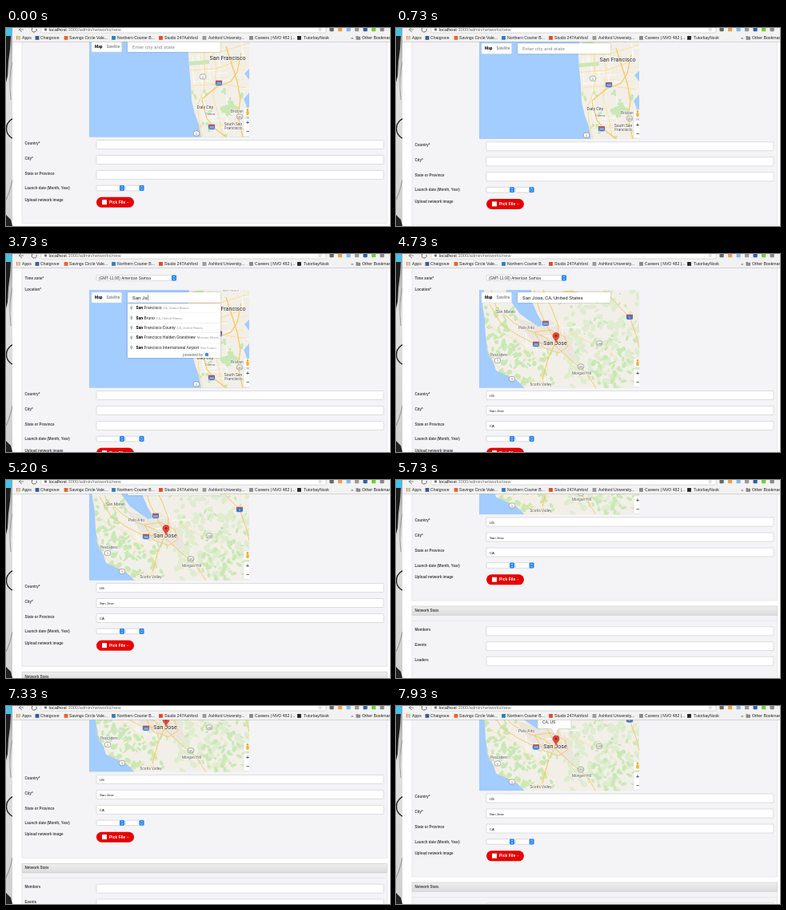
These frames come from a looping animation (480x248 px, 8000 ms). An HTML page with a canvas:

```html
<!DOCTYPE html>
<html lang="en">
<head>
<meta charset="utf-8">
<title>New network form</title>
<style>
html, body { margin: 0; width: 100%; height: 100%; overflow: hidden; background: #fff; }
canvas { display: block; width: 480px; height: 248px; }
</style>
</head>
<body>
<canvas id="stage"></canvas>
<script>
const LOOP = 8000, W = 480, H = 248;
const canvas = document.getElementById('stage');
const ratio = window.devicePixelRatio || 1;
canvas.width = W * ratio;
canvas.height = H * ratio;
const c = canvas.getContext('2d');
const SANS = '"Liberation Sans", sans-serif', ROBOTO = 'Roboto, sans-serif';

// Each pair is [time, scroll offset], eased in between.
const scrollKeys = [[0, 31], [600, 31], [1400, 0], [4800, 0], [5130, 42], [5270, 42],
  [5650, 124.5], [5800, 124.5], [6060, 86.5], [7270, 86.5], [7700, 61.5], [LOOP, 61.5]];
const typing = [[0, ''], [2650, 'S'], [2800, 'Sa'], [2950, 'San'], [3250, 'San '], [3450, 'San J'],
  [3650, 'San Js'], [3880, 'San J'], [4020, 'San Jo'], [4180, 'San Jos'], [4330, 'San Jose'],
  [4550, 'San Jose, CA, United States']];
const MENU_OPEN = 2950, PICKED = 4550, INFO_OPEN = 7600;

function scrollAt(t) {
  const i = scrollKeys.findIndex(k => k[0] > t);
  const [t0, a] = scrollKeys[i - 1], [t1, b] = scrollKeys[i];
  const p = (t - t0) / (t1 - t0);
  return a + (b - a) * p * p * (3 - 2 * p);
}

function box(x, y, w, h, fill, stroke, radius = 0) {
  c.beginPath();
  c.roundRect(x, y, w, h, radius);
  if (fill) { c.fillStyle = fill; c.fill(); }
  if (stroke) { c.strokeStyle = stroke; c.lineWidth = 0.6; c.stroke(); }
}

function disc(x, y, r, fill) {
  c.beginPath();
  c.arc(x, y, r, 0, 7);
  c.fillStyle = fill;
  c.fill();
}

// Draws text centred vertically on y and returns its right edge.
function text(s, x, y, size, color = '#222', { font = SANS, weight = '', align = 'left' } = {}) {
  c.font = `${weight} ${size}px ${font}`;
  c.textAlign = align;
  c.textBaseline = 'alphabetic';
  c.fillStyle = color;
  c.fillText(s, x, y + size * 0.35);
  return x + c.measureText(s).width;
}

function label(s, y) {
  text(s, 23.5, y, 4.5, '#444', { weight: 'bold' });
}

function shape(d, fill, stroke, width = 1) {
  const path = new Path2D(d);
  if (fill) { c.fillStyle = fill; c.fill(path); }
  if (stroke) { c.strokeStyle = stroke; c.lineWidth = width; c.lineJoin = 'round'; c.stroke(path); }
}

function seeded(seed) {
  return () => (seed = (seed * 16807) % 2147483647) / 2147483647;
}

function place(s, x, y, size = 5, color = '#555') {
  c.font = `${size}px ${ROBOTO}`;
  c.textAlign = 'center';
  c.strokeStyle = 'rgba(255,255,255,.8)';
  c.lineWidth = 1.2;
  c.strokeText(s, x, y + size * 0.35);
  text(s, x, y, size, color, { font: ROBOTO, align: 'center' });
}

function shield(s, x, y, interstate) {
  if (interstate) {
    box(x - 4.5, y - 3.5, 9, 7, '#4a73b8', '#fff', 2.5);
    box(x - 4, y - 3.2, 8, 1.5, '#c9504c');
  } else box(x - 3.7, y - 3, 7.4, 6, '#fff', '#777', 2.5);
  text(s, x, y + 0.4, 3.6, interstate ? '#fff' : '#444', { align: 'center' });
}

function patches(seed, count, x, y, w, h, color, size) {
  const random = seeded(seed);
  c.fillStyle = color;
  for (let i = 0; i < count; i++) {
    c.beginPath();
    c.ellipse(x + random() * w, y + random() * h, size * (0.4 + random()), size * (0.3 + random() * 0.6),
      random() * 3, 0, 7);
    c.fill();
  }
}

function streets(seed, count, x, y, w, h) {
  const random = seeded(seed);
  for (let i = 0; i < count; i++) {
    const n = 6 + random() * 18;
    const run = random() < 0.5 ? `${n} -1` : `2 ${n}`;
    shape(`M${x + random() * w} ${y + random() * h}l${run}`, null, i % 3 ? '#fff' : '#fbe6a9', 0.7);
  }
}

const LAND = '#f2efe8', WATER = '#a3ccff', GREEN = '#c9e8b5', ROAD = '#fbdf94', HIGHWAY = '#f8c65a';

function coastMap() {
  box(104, 45, 200, 123, WATER);
  const land = 'M229 45L228 64L229 80L231 100L232 122L236 138L241 152L244 168H304V146L297 140L301 130' +
    'L297 120L304 112V96L298 88L304 82V45Z';
  shape(land, LAND);
  c.save();
  c.clip(new Path2D(land));
  streets(31, 50, 228, 45, 76, 122);
  patches(8, 26, 232, 108, 66, 58, GREEN, 3.6);
  shape('M229 73L254 71V76L229 78Z', GREEN);
  shape('M268 130L282 125L292 131L280 138L270 137Z', GREEN);
  shape('M233 47L245 45L250 52L234 55Z', GREEN);
  shape('M247 45L249 94L246 112L240 126L241 147L246 168M229 84L262 82L290 72', null, ROAD, 1.1);
  shape('M231 62L268 61L304 50M235 103L268 101L301 106M254 46L263 80L259 118L266 142L271 168', null, ROAD, 0.9);
  shape('M245 120L263 105L281 98L289 86L294 62M245 121L251 144L261 157L276 168', null, HIGHWAY, 1.2);
  shape('M275 54L284 82L289 98L293 120L290 141L296 168', null, HIGHWAY, 1.2);
  c.restore();
  place('NORTH BEACH', 281, 46, 3, '#888');
  place('San Francisco', 277, 68, 7.2, '#222');
  place('Daly City', 249, 130, 5.4, '#333');
  place('Colma', 255, 138.5, 4.4);
  place('Brisbane', 290, 135, 4.6);
  place('South San', 284, 151, 5, '#444');
  place('Francisco', 284, 156.5, 5, '#444');
  shield('1', 246, 92);
  shield('1', 238, 163);
  shield('101', 292, 142);
  shield('280', 266, 100, true);
  shield('280', 257, 155, true);
}

function valleyMap() {
  box(104, 45, 200, 123, LAND);
  patches(5, 150, 212, 46, 96, 124, '#dfecd0', 4.5);
  patches(77, 55, 245, 105, 60, 64, GREEN, 3.2);
  patches(9, 30, 205, 46, 98, 90, GREEN, 2.4);
  patches(12, 75, 112, 66, 40, 84, GREEN, 3.4);
  patches(44, 50, 140, 112, 62, 52, GREEN, 3.2);
  shape('M150 80L176 88L192 82L207 92L219 112L226 132L214 128L200 122L180 118L166 104Z', '#eae6df');
  streets(17, 26, 160, 86, 50, 32);
  shape('M104 45H110L108 62L111 83L112 104L115 122L122 136L125 146L139 152L151 158L161 168H104Z', WATER);
  shape('M137 45L144 60L155 75L166 83L178 91L185 89L177 76L171 62L169 45Z', WATER);
  shape('M113 90L135 99L160 115L184 140L184 168M113 116L117 129L130 145L150 157L182 161' +
    'M200 111L221 99L242 111L259 112L278 134M188 130L190 148L180 161', null, ROAD, 0.7);
  shape('M119 45L125 66L147 86L166 96L186 104L204 119L220 134L238 149L250 168' +
    'M117 63L131 87L151 101L173 112L199 111M173 45L179 70L187 87L200 110L191 128L183 157' +
    'M184 45L195 69L203 90L202 110M260 45L283 70L292 79L301 104L304 118M178 52L218 47L258 52' +
    'M173 98L193 95L211 104L215 116L203 124L184 117Z', null, HIGHWAY, 0.9);
  place('San Mateo', 137, 72, 5);
  place('Palo Alto', 163, 92.5, 5);
  place('Pescadero', 129, 126, 4.5);
  place('Morgan Hill', 232, 149, 4.7);
  place('Scotts Valley', 181, 163, 4.7);
  shield('1', 127, 133.5);
  shield('1', 145, 156.5);
  shield('101', 231, 141);
  shield('130', 254, 112);
  shield('5', 292, 79, true);
  shield('280', 175, 113, true);
  shield('680', 187, 87, true);
  place('San Jose', 199, 111.5, 7.2, '#222');
  shape('M200 111C199 106 196 106 196 102.5A4 4 0 0 1 204 102.5C204 106 201 106 200 111Z', '#e8453c', '#a92a23', 0.5);
  disc(200, 102.5, 1.3, '#7d1b17');
}

function infoWindow() {
  shape('M178 70H218Q219 70 219 71V89Q219 90 218 90H203L199 98L194 90H178Q177 90 177 89V71Q177 70 178 70Z',
    '#fff', '#bbb', 0.5);
  text('San Jose,', 183, 75, 5, '#333', { font: ROBOTO });
  text('CA, US', 183, 81.5, 5.4, '#333', { font: ROBOTO });
}

function mapControls() {
  box(107, 48, 37.5, 13, '#fff', '#ddd', 1);
  text('Map', 111, 54.5, 4.8, '#000', { font: ROBOTO, weight: 'bold' });
  text('Satellite', 125.5, 54.5, 4.7, '#666', { font: ROBOTO });
  box(297, 131, 10, 11, '#fff', '#ddd', 1);
  disc(302, 133.5, 1.4, '#e9a820');
  box(300.3, 135, 3.4, 5, '#f3b62c', null, 1);
  box(297, 144.5, 10, 22, '#fff', '#ddd', 1);
  const bold = { weight: 'bold', align: 'center' };
  text('+', 302, 150, 7, '#444', bold);
  text('−', 302, 161, 7, '#444', bold);
}

const suggestions = [
  ['Francisco', 'CA, United States'], ['Bruno', 'CA, United States'],
  ['Francisco County', 'CA, United States'],
  ['Francisco Halden Grandview', 'Mission Street,...'],
  ['Francisco International Airport', 'San Franci...']];

function searchBox(t) {
  const typed = typing.filter(k => k[0] <= t).pop()[1];
  c.shadowColor = 'rgba(0,0,0,.3)';
  c.shadowBlur = 2 * ratio;
  box(152, 48, 116, 13, '#fff', null, 1);
  c.shadowBlur = 0;
  const end = text(typed || 'Enter city and state', 158, 54.7, 6.2, typed ? '#222' : '#888', { font: ROBOTO });
  if (typed && t < PICKED) box(end + 0.5, 51.3, 0.5, 7, '#222');
  if (t < MENU_OPEN || t >= PICKED) return;

  c.shadowBlur = 2 * ratio;
  box(152, 62, 116, 68, '#fff');
  c.shadowBlur = 0;
  suggestions.forEach(([name, area], i) => {
    const y = 67.5 + i * 12.4;
    if (i) box(152, y - 6.2, 116, 0.4, '#e4e4e4');
    disc(156.8, y - 0.8, 1.5, '#aaa');
    shape(`M155.4 ${y}h2.8l-1.4 3Z`, '#aaa');
    disc(156.8, y - 0.8, 0.5, '#fff');
    let x = text('San', 162.5, y, 5.1, '#000', { font: ROBOTO, weight: 'bold' });
    x = text(name, x + 1.3, y, 5.1, '#222', { font: ROBOTO });
    text(area, x + 1.8, y + 0.2, 4.2, '#999', { font: ROBOTO });
  });
  text('powered by', 221, 126, 4.9, '#666');
  disc(251, 126, 2.3, '#4285f4');
}

function select(x, y, w, value = '') {
  box(x, y - 3.3, w, 6.6, '#fff', '#c4c4c4', 1.3);
  text(value, x + 3, y, 4.8);
  box(x + w - 6, y - 3.4, 6, 6.8, '#2486f2', null, 1.3);
  shape(`M${x + w - 4.3} ${y - 0.7}l1.3 -1.4l1.3 1.4m0 1.4l-1.3 1.4l-1.3 -1.4`, null, '#fff', 0.6);
}

function field(name, y, value = '') {
  label(name, y - 1.8);
  box(113, y - 5.5, 359, 11, '#fff', '#ccc', 0.8);
  text(value, 117, y + 0.5, 4.3, '#111');
}

function page(t) {
  const picked = t >= PICKED;
  box(20, -20, 456.5, 295.5, '#f4f3f6', '#ddd');
  label('Time zone*', 30);
  select(113, 30, 100, '(GMT-11:00) American Samoa');
  label('Location*', 44);

  c.save();
  c.beginPath();
  c.rect(104, 45, 200, 122.7);
  c.clip();
  picked ? valleyMap() : coastMap();
  mapControls();
  if (t >= INFO_OPEN) infoWindow();
  c.restore();
  searchBox(t);

  field('Country*', 177, picked ? 'US' : '');
  field('City*', 196, picked ? 'San Jose' : '');
  field('State or Province', 215, picked ? 'CA' : '');
  label('Launch date (Month, Year)', 231.5);
  select(113, 231.5, 35);
  select(149.5, 231.5, 23);
  label('Upload network image', 246);
  box(113, 242.8, 47, 13, '#e60000', null, 6.5);
  box(120, 246.2, 6, 6, '#fff');
  text('Pick File', 129, 249.2, 5, '#fff', { weight: 'bold' });
  box(151.5, 249, 1.6, 0.6, '#fff');

  box(20, 294, 456.5, 110, '#f4f3f6', '#ddd');
  const shade = c.createLinearGradient(0, 282, 0, 294);
  shade.addColorStop(0, '#efefef');
  shade.addColorStop(1, '#dcdcdc');
  box(20, 282.5, 456.5, 11.3, shade, '#c8c8c8');
  label('Network Stats', 288);
  box(20, 300.5, 456.5, 0.5, '#ddd');
  ['Members', 'Events', 'Leaders'].forEach((name, i) => field(name, 313.8 + i * 18.8));
}

function desktop() {
  const tone = c.createLinearGradient(0, 0, 0, H);
  tone.addColorStop(0, '#9a9a9a');
  tone.addColorStop(0.3, '#e2e2e2');
  tone.addColorStop(1, '#cfcfcf');
  box(0, 0, 8, H, tone);
  box(0, 0, 7, 10, '#43c3e6');
  shape('M0 10H6L5 26L3 42L2 60L0 68Z', '#1d1d1d');
  shape('M8 42Q3 60 6 90', null, '#999', 1);
  c.beginPath();
  c.arc(14, 126, 13.5, 0, 7);
  c.strokeStyle = '#222';
  c.lineWidth = 1.4;
  c.stroke();
  shape('M0 215Q5 205 8 190', null, '#999', 1.2);
  shape('M0 234L6 240L8 248H0Z', '#222');
  box(8, 0, W - 8, H, '#fff');
}

const bookmarks = [[39, 43, 'Chatgrove', '#3b5998'], [75, 79, 'Savings Circle Vale...', '#e8642c'],
  [134.5, 139, 'Northern Courier B...', '#2d7fc1'], [193.5, 198, 'Studio 247Ashford', '#e2472c'],
  [248, 253, 'Ashford University...', '#999'], [306.5, 311, 'Careers | NVO 482 |...', '#888'],
  [366.5, 372, 'TutorbayNook', '#222']];

function browserBar() {
  box(8, 0, 472, 17, '#f2f2f2');
  box(8, 17, 472, 0.5, '#b5b5b5');
  box(44, -6, 356, 12, '#fff', '#c4c4c4', 1.5);
  shape('M20 -1L16 2L20 5M16 2H22', null, '#777', 0.8);
  shape('M38 1A3 3 0 1 1 35 -1', null, '#555', 0.9);
  disc(49.5, 2, 1.8, '#777');
  const x = text('localhost', 53.5, 1.8, 5.7, '#111');
  text(':3000/admin/networks/new', x, 1.8, 5.7, '#666');
  text('☆', 390, 1.5, 6, '#555', { font: '"DejaVu Sans", sans-serif' });
  ['#666', '#eda04c', '#7fb9e6', '#999', '#2f5fa8', '#6fcf3c', '#888'].forEach((color, i) =>
    box(404.5 + i * 10.5, -1, 5.2, 5.2, color, null, 1));

  ['#e05243', '#f0b52e', '#4b9b58'].forEach((color, i) => {
    for (let j = 0; j < 3; j++) box(13 + i * 1.7, 10 + j * 1.7, 1.2, 1.2, color);
  });
  text('Apps', 20, 12.4, 5.2);
  for (const [iconX, textX, title, color] of bookmarks) {
    box(iconX - 2.4, 10, 4.8, 4.8, color);
    text(title, textX, 12.4, 5.1);
  }
  text('»', 431, 12, 6, '#555');
  shape('M437.5 10h2l.7 .8h2.8v4h-5.5Z', '#8a8a8a');
  text('Other Bookmarks', 445, 12.4, 5.2);
}

function draw(now) {
  const t = now % LOOP;
  c.setTransform(ratio, 0, 0, ratio, 0, 0);
  desktop();
  c.save();
  c.translate(0, -scrollAt(t));
  page(t);
  c.restore();
  browserBar();
}

const start = performance.now();
function tick() {
  draw(performance.now() - start);
  requestAnimationFrame(tick);
}
tick();
</script>
</body>
</html>
```
